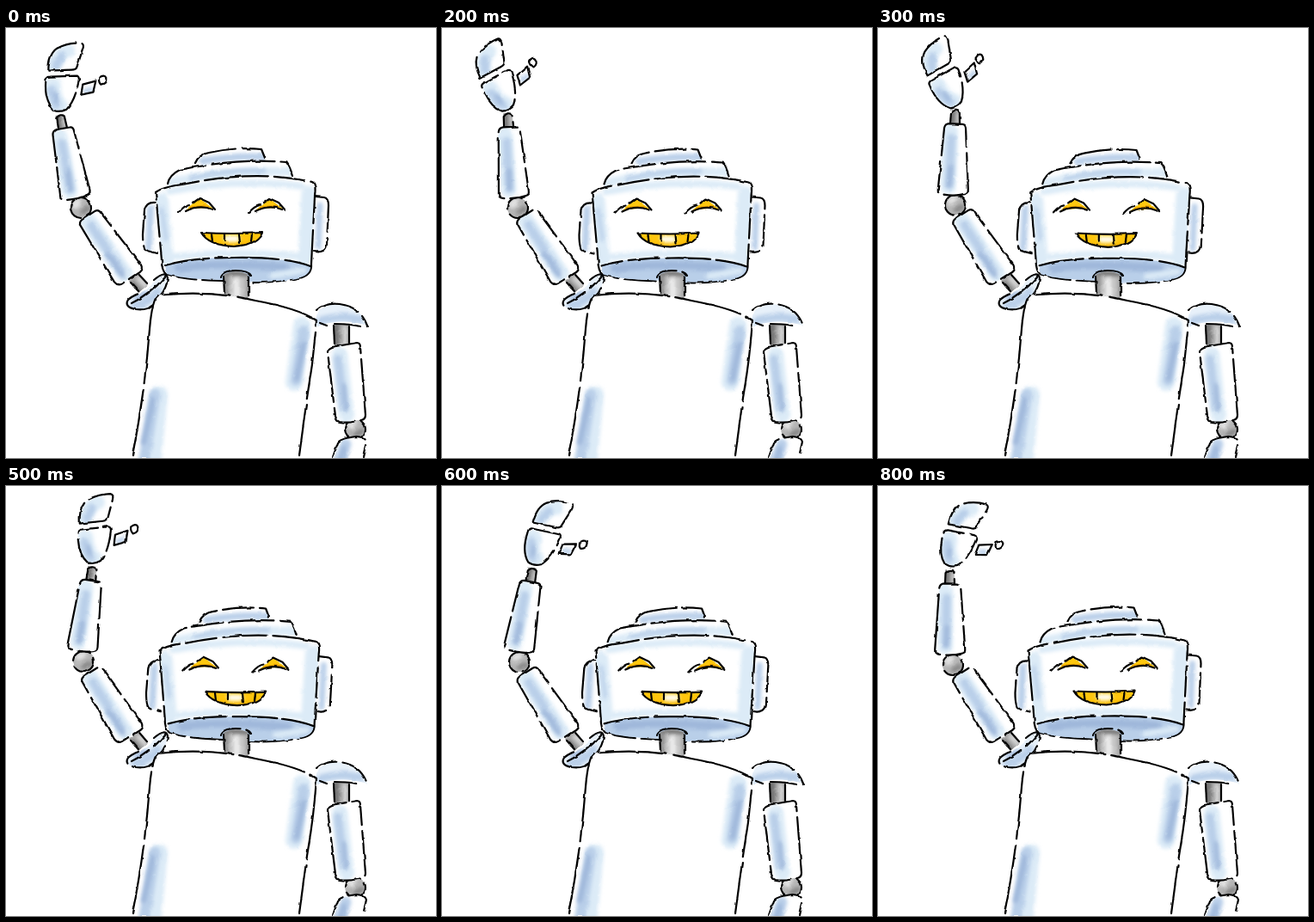
An HTML page for the animation above (900 ms loop, 500 px wide and 500 px high).

```html
<!DOCTYPE html>
<html lang="en">
<head>
<meta charset="utf-8">
<title>Waving robot</title>
<style>
  html, body { margin: 0; width: 100%; height: 100%; overflow: hidden; background: #fff; }
  svg { display: block; width: 100%; height: 100%; animation: wave 900ms step-end infinite; }

  .ink { fill: none; stroke: #000; stroke-width: 2.2; stroke-linecap: round; stroke-linejoin: round; }
  .dash { stroke-dasharray: 52 7 74 7 36 7; stroke-dashoffset: var(--dash); }
  #torso .dash { stroke-dasharray: 78 7 104 7; }
  .shade { fill: none; stroke-linecap: round; stroke-linejoin: round; filter: url(#soft); }

  #head { transform-origin: 267px 290px; transform: translate(var(--shift)) rotate(var(--head)); }
  #upper { transform-origin: 152px 297px; transform: rotate(var(--upper)); }
  #fore { transform: translate(var(--elbow)) rotate(var(--fore)); }
  #hand { transform: translate(2px, -115px) rotate(var(--hand)); }

  @keyframes wave {
    0%      { --fore: -13.4deg; --hand: 13.4deg;  --elbow: 87px, 209px; --upper: -.8deg; --head: 0deg;  --shift: 0, 0;         --dash: 0; }
    11.111% { --fore: -10.4deg; --hand: -3deg;    --elbow: 87px, 209px; --upper: -.2deg; --head: 0deg;  --shift: 0, 0;         --dash: 52; }
    22.222% { --fore: -6.6deg;  --hand: -19.4deg; --elbow: 88px, 209px; --upper: .4deg;  --head: 0deg;  --shift: .5px, .5px;   --dash: 108; }
    33.333% { --fore: -.6deg;   --hand: -27deg;   --elbow: 90px, 206px; --upper: .4deg;  --head: .4deg; --shift: 2.5px, .8px;  --dash: 0; }
    44.444% { --fore: 2deg;     --hand: -23deg;   --elbow: 91px, 204px; --upper: 1deg;   --head: .6deg; --shift: 3.5px, 1.2px; --dash: 52; }
    55.555% { --fore: 5deg;     --hand: -9deg;    --elbow: 90px, 204px; --upper: 1deg;   --head: .6deg; --shift: 3.5px, 1.2px; --dash: 108; }
    66.666% { --fore: 7.4deg;   --hand: 6.6deg;   --elbow: 90px, 205px; --upper: .6deg;  --head: .6deg; --shift: 3.5px, 1.2px; --dash: 0; }
    77.777% { --fore: 2.4deg;   --hand: 11.5deg;  --elbow: 88px, 206px; --upper: .4deg;  --head: .4deg; --shift: 2.5px, .8px;  --dash: 52; }
    88.888% { --fore: -2.4deg;  --hand: 15deg;    --elbow: 87px, 208px; --upper: .4deg;  --head: 0deg;  --shift: .5px, .5px;   --dash: 108; }
  }
</style>
</head>
<body>
<svg id="stage" viewBox="0 0 500 500"></svg>
<script>
const PALE = '#dcebf7', MID = '#b9cfe9', DEEP = '#9fb7da';
const GREY = '#a9a9a9', DARK = '#6c6c6c', LIGHT = '#e4e4e4';
let clips = 0;

const ink = (d, dashed = true) => `<path class="ink${dashed ? ' dash' : ''}" d="${d}"/>`;

// A filled shape with soft brush strokes kept inside it, then its outline.
function part(d, { fill = '#fff', shades = [], line = d, dashed = true } = {}) {
  const id = 'clip' + clips++;
  const strokes = shades.map(([path, colour, width]) =>
    `<path class="shade" d="${path}" stroke="${colour}" stroke-width="${width}"/>`).join('');
  return `<clipPath id="${id}"><path d="${d}"/></clipPath><path d="${d}" fill="${fill}"/>
    <g clip-path="url(#${id})">${strokes}</g>${ink(line, dashed)}`;
}

const group = (id, ...items) => `<g id="${id}">${items.join('')}</g>`;

const ball = (x, y, r) => part(
  `M${x - r} ${y}a${r} ${r} 0 1 1 ${2 * r} 0a${r} ${r} 0 1 1 ${-2 * r} 0Z`,
  { fill: '#b5b5b5', shades: [
    [`M${x - 6} ${y - 5}l4 -2`, LIGHT, 8],
    [`M${x + 1} ${y + 6}l7 -4`, '#858585', 6]] });

const eye = x => `<g transform="translate(${x} 0)">
  <path d="M9 212L25 198L41 210Q25 208 9 212Z" fill="#ffc80f"/>
  <path d="M14 209Q26 206 36 208" fill="none" stroke="#e8a000" stroke-width="2"/>
  ${ink('M1 215Q8 207 14 206M18 203L25 198L36 203L43 211', false)}
  ${ink('M9 213Q25 205 40 211', false)}</g>`;

const mouth = part('M227 238Q264 240 298 238Q293 252 265 254Q236 253 227 238Z', {
  fill: '#ffc60d', dashed: false,
  shades: [['M236 250Q266 258 292 248', '#f0a800', 3], ['M257 245L268 245', '#fffdf2', 8]],
}) + ink('M239 240L240 248M254 240L254 248M271 240L272 250M286 240L285 248', false);

const headLine = 'M174 191Q182 185 205 182Q290 164 356 179Q361 181 359 196L355 274Q356 288 340 291Q300 299 262 294Q210 294 186 286Q181 282 181 270Z';

const head = group('head',
  part('M176 203Q163 202 161 212L159 240Q159 258 164 259L178 263Z', {
    shades: [['M168 210L166 256', MID, 8]],
    line: 'M174 203Q163 202 161 212L159 240Q159 258 164 259L176 262' }),
  part('M357 196L370 197Q375 198 375 206L373 252Q372 262 366 261L354 260Z', {
    shades: [['M365 206L363 255', MID, 7]],
    line: 'M360 196L370 197Q375 198 375 206L373 252Q372 262 358 260' }),
  part('M220 160Q224 147 236 145Q268 138 297 141Q301 145 302 160Z', {
    shades: [['M228 155Q265 148 300 150', MID, 8]],
    line: 'M220 157Q224 147 236 145Q268 138 297 141L301 151' }),
  part('M187 185Q190 171 202 165Q270 151 326 156Q333 164 333 182Z', {
    shades: [['M190 180Q250 165 332 167', PALE, 10], ['M215 174Q265 164 300 166', MID, 5]],
    line: 'M188 181Q190 171 202 165Q270 151 326 156Q330 161 333 171' }),
  part(headLine, { shades: [
    ['M181 200L187 268', PALE, 16],
    ['M352 192L348 268', PALE, 17],
    ['M190 190Q270 174 345 184', PALE, 8],
    ['M195 266Q265 258 345 266', PALE, 8],
    ['M181 210L186 245', MID, 4]] }),
  part('M185 276Q215 267 265 267Q325 266 354 277Q354 288 338 291Q300 298 262 293Q210 293 187 286Z', {
    fill: MID,
    shades: [['M200 279Q250 272 325 278', DEEP, 9], ['M310 288L346 282', PALE, 7]],
    line: 'M185 276Q215 267 265 267Q325 266 354 277' }),
  eye(200), eye(281), mouth);

const neck = part('M253 287Q267 279 282 287L282 320L254 320Z', {
  fill: '#c4c4c4', line: 'M250 289Q252 282 267 282Q282 282 285 288M253 289L254 308M282 289L282 311',
  shades: [['M253 287Q267 284 283 287', DARK, 5], ['M256 290L256 316', '#8b8b8b', 6],
    ['M268 293L268 316', '#f0f0f0', 6], ['M281 291L281 316', '#9a9a9a', 4]] });

const torsoEdge = 'M147 497Q161 428 167 350Q170 315 177 311Q235 304 290 317Q340 326 361 340Q358 385 350 430L341 497';
const torso = group('torso', part(torsoEdge + 'L341 502L146 502Z', {
  line: torsoEdge,
  shades: [
    ['M178 426L171 500', PALE, 20], ['M173 426L161 500', MID, 13], ['M171 432L160 482', DEEP, 6],
    ['M344 346L335 412', PALE, 20], ['M346 352L337 410', MID, 12], ['M346 368L338 408', DEEP, 6]] }));

const rightArm = [
  part('M382 344L399 344L400 370L382 370Z', {
    fill: GREY, line: 'M381 346L382 367M399 347L399 366',
    shades: [['M384 346L384 368', DARK, 6], ['M394 348L394 368', LIGHT, 4]] }),
  part('M357 347Q360 324 382 321Q412 322 420 346Q390 337 365 346Z', {
    fill: '#e8f1fa', line: 'M361 328Q372 319 388 321Q412 324 420 346M365 343L373 346M382 344Q400 344 412 347',
    shades: [['M366 340Q390 333 412 339', MID, 9]] }),
  ball(406, 467, 12),
  part('M374 377Q374 373 379 371L408 366Q412 366 412 371L418 450Q418 455 413 456Q399 460 388 458Q384 457 383 451Z', {
    shades: [['M388 380L396 450', PALE, 18], ['M386 385L393 442', MID, 10], ['M393 415L395 444', DEEP, 4]] }),
  part('M378 502L386 482Q389 477 408 475Q418 476 419 481L415 502Z', {
    line: 'M380 499L386 482Q389 477 408 475Q418 476 419 481L415 499',
    shades: [['M395 484L389 502', MID, 13], ['M393 488L389 502', DEEP, 5]] }),
].join('');

const upperArm = group('upper',
  part('M143 294L153 286L165 299L154 308Z', {
    fill: GREY, shades: [['M146 297L156 308', DARK, 5], ['M154 291L162 299', LIGHT, 4]],
    line: 'M145 296L154 306M155 287L164 297' }),
  part('M87 228Q86 224 91 221L105 212Q109 210 112 215L157 275Q160 280 155 284L135 297Q130 300 126 295Z', {
    shades: [['M97 224L138 286', PALE, 19], ['M100 229L134 282', MID, 10], ['M118 262L136 288', DEEP, 5]] }));

const socket = part('M141 321Q142 315 150 311Q165 306 174 293Q186 281 188 291Q187 302 179 312Q171 325 158 328Q142 327 141 321Z', {
  fill: '#e8f1fa', line: 'M172 293Q186 281 188 291Q187 302 179 312M146 320Q168 310 185 289M171 322Q162 329 150 327Q137 324 142 316Q146 312 154 309',
  shades: [['M150 323Q167 319 177 306', MID, 9], ['M151 314L163 309', DEEP, 5]] });

// Drawn upright with the elbow at 0,0; the hand has its wrist there.
const hand = group('hand',
  part('M-16 -36Q-16 -40 -11 -40L19 -41Q24 -41 22 -34Q18 -12 8 -2Q0 2 -7 -1Q-18 -12 -16 -36Z', {
    shades: [['M-8 -30Q-8 -14 0 -6', PALE, 19], ['M-9 -25Q-8 -14 -3 -7', MID, 10], ['M-5 -20L-4 -11', DEEP, 4]] }),
  part('M-13 -47Q-13 -66 -3 -73Q10 -80 25 -79Q29 -78 27 -72L20 -51Q19 -48 14 -48Z', {
    shades: [['M-7 -52Q0 -68 10 -70', PALE, 16], ['M-4 -53L2 -64', MID, 10]] }),
  part('M27 -31L42 -35L39 -22L25 -19Z', { shades: [['M30 -23L36 -25', MID, 6]], dashed: false }),
  part('M46 -39Q52 -43 54 -39Q55 -32 48 -31Q45 -34 46 -39Z', { dashed: false }));

const foreArm = group('fore',
  ball(0, 0, 12),
  part('M-4 -111L6 -111L6 -92L-5 -92Z', {
    fill: GREY, line: 'M-5 -95L-4 -107Q1 -113 6 -108L6 -95',
    shades: [['M-2 -109L-3 -94', DARK, 5], ['M5 -106L5 -95', LIGHT, 2]] }),
  part('M-12 -90Q-11 -95 -6 -95L9 -94Q13 -94 13 -89L15 -18Q15 -14 11 -13Q-2 -10 -16 -13Q-21 -14 -20 -19Z', {
    shades: [['M-5 -86L-8 -22', PALE, 18], ['M-4 -78L-7 -24', MID, 10], ['M-5 -44L-7 -23', DEEP, 5]] }),
  hand);

document.getElementById('stage').innerHTML = `
  <defs>
    <filter id="soft" filterUnits="userSpaceOnUse" x="-150" y="-150" width="800" height="800">
      <feGaussianBlur stdDeviation="2.2"/>
    </filter>
    <filter id="wobble" filterUnits="userSpaceOnUse" x="0" y="0" width="500" height="500" color-interpolation-filters="sRGB">
      <feTurbulence type="fractalNoise" baseFrequency=".09" numOctaves="2" seed="4" result="noise"/>
      <feDisplacementMap in="SourceGraphic" in2="noise" scale="3" xChannelSelector="R" yChannelSelector="G"/>
    </filter>
  </defs>
  <g filter="url(#wobble)">${upperArm}${socket}${foreArm}${head}${neck}${rightArm}${torso}</g>`;
</script>
</body>
</html>
```
